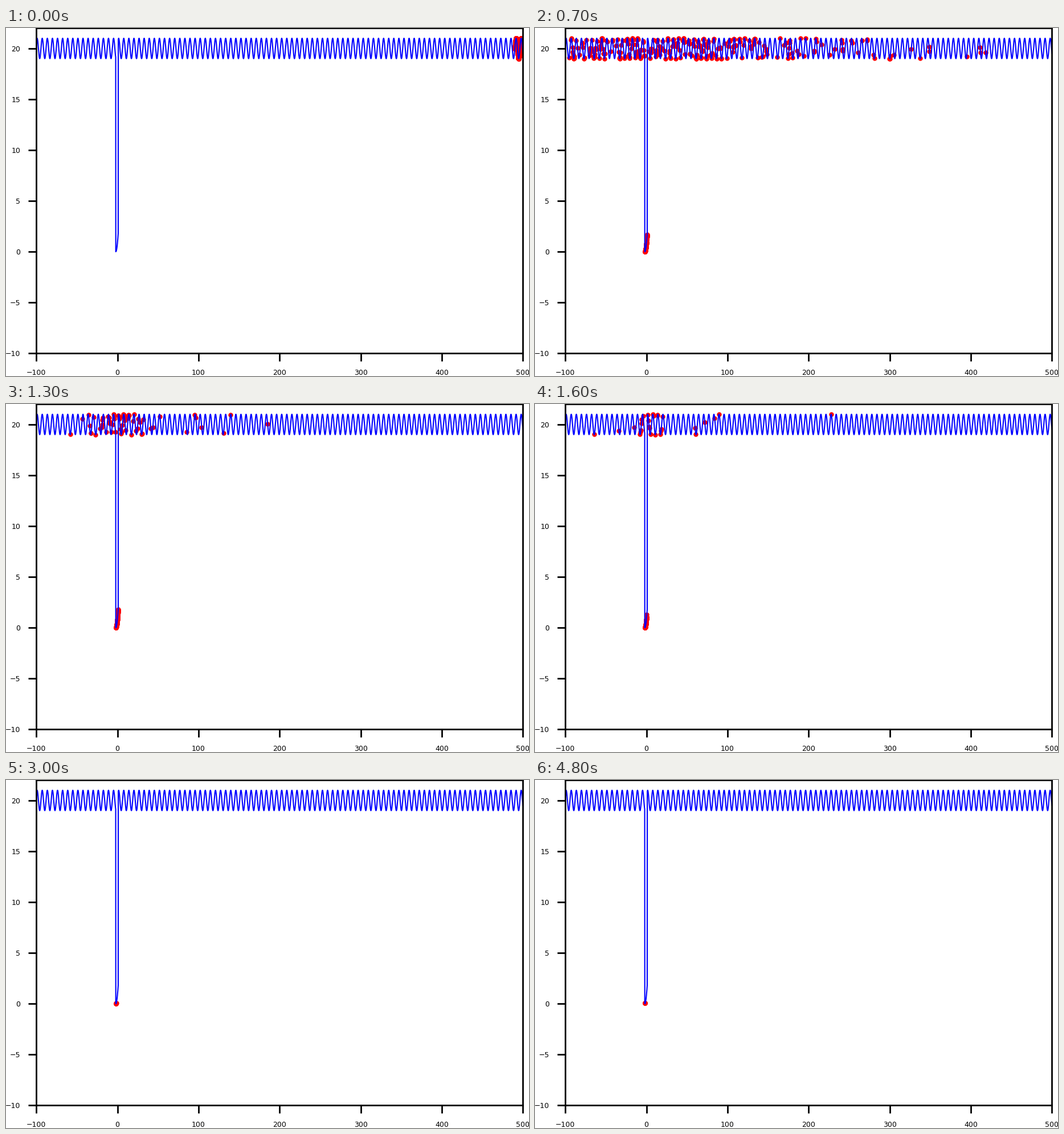
Animation, 918 px wide and 610 px high, one loop 4.9 s. Source, as a matplotlib script:

```python
import matplotlib.pyplot as plt
import numpy as np
from matplotlib.animation import FuncAnimation

W, H, DPI = 918, 610, 100
FRAMES, INTERVAL = 49, 100
FOUND = 6    # generation in which the well is first reached
SETTLED = 30  # generation from which nobody roams the plateau


def landscape(x):
    """A wavy plateau with one narrow parabolic well."""
    inside = (x >= -2) & (x <= 1)
    return np.where(inside, (x + 2) ** 2 / 5, 20 + np.sin(x))


def front(n, rng):
    """Early generations: a dense front moving left, with a few scouts ahead."""
    edge = 490 - 80 * (n / 5) ** 2
    scouts = edge - rng.exponential(35 * (n / 5) ** 6, 4 * n)
    return np.concatenate([rng.uniform(edge, 500, 500), scouts])


def plateau(n, rng):
    """Later generations: a core around the well and wide strays, both thinning out."""
    age = n - 9
    core = rng.normal(3, max(11, 18 * (9 / n) ** 8), int(130 * np.exp(-0.25 * age)))
    strays = rng.standard_cauchy(int(100 * np.exp(-0.27 * age)))
    strays *= 75 * np.exp(-0.1 * age)
    return np.concatenate([core, strays])


def well(n, rng):
    """Members inside the well, contracting to one spot."""
    if n < SETTLED:
        top = -2 + np.clip(3 * np.exp((14 - n) / 8), 0.8, 3)
        return rng.uniform(-2, top, 4 if n == FOUND else 80 if n < 20 else 20)
    k = (n - SETTLED) / (FRAMES - 1 - SETTLED)
    members = rng.uniform(-2 + 0.55 * k, -1.2 - 0.25 * k, 8)
    if n % 6 == 3:  # an occasional mutation
        members[0] = rng.uniform(-1.5, -0.5)
    return members


def population(n):
    rng = np.random.default_rng(100 + n)
    if n < FOUND:
        return front(n, rng)
    roam = front(n, rng) if n == FOUND else plateau(n, rng)
    limit = 500 - 7 * max(0, n - 9)
    roam = roam[(roam > -96) & (roam < limit)]
    return np.concatenate([roam, well(n, rng)])


fig = plt.figure(figsize=(W / DPI, H / DPI), dpi=DPI, facecolor="white")
ax = fig.add_axes([53.2 / W, 39.8 / H, 854 / W, 570 / H])
ax.set(xlim=(-100, 500), ylim=(-10, 22),
       xticks=range(-100, 501, 100), yticks=range(-10, 21, 5))
ax.tick_params(length=10, width=2, pad=10, labelsize=9, labelfontfamily="DejaVu Sans")
for spine in ax.spines.values():
    spine.set_linewidth(2)

xs = np.linspace(-100, 500, 6001)
ax.plot(xs, landscape(xs), color="blue", lw=1.5, zorder=2)
dots, = ax.plot([], [], "o", color="red", ms=6, mew=0, zorder=1)


def update(n):
    x = population(n)
    dots.set_data(x, landscape(x))
    return dots,


anim = FuncAnimation(fig, update, frames=FRAMES, interval=INTERVAL,
                     repeat=True, repeat_delay=0)
plt.show()
```
